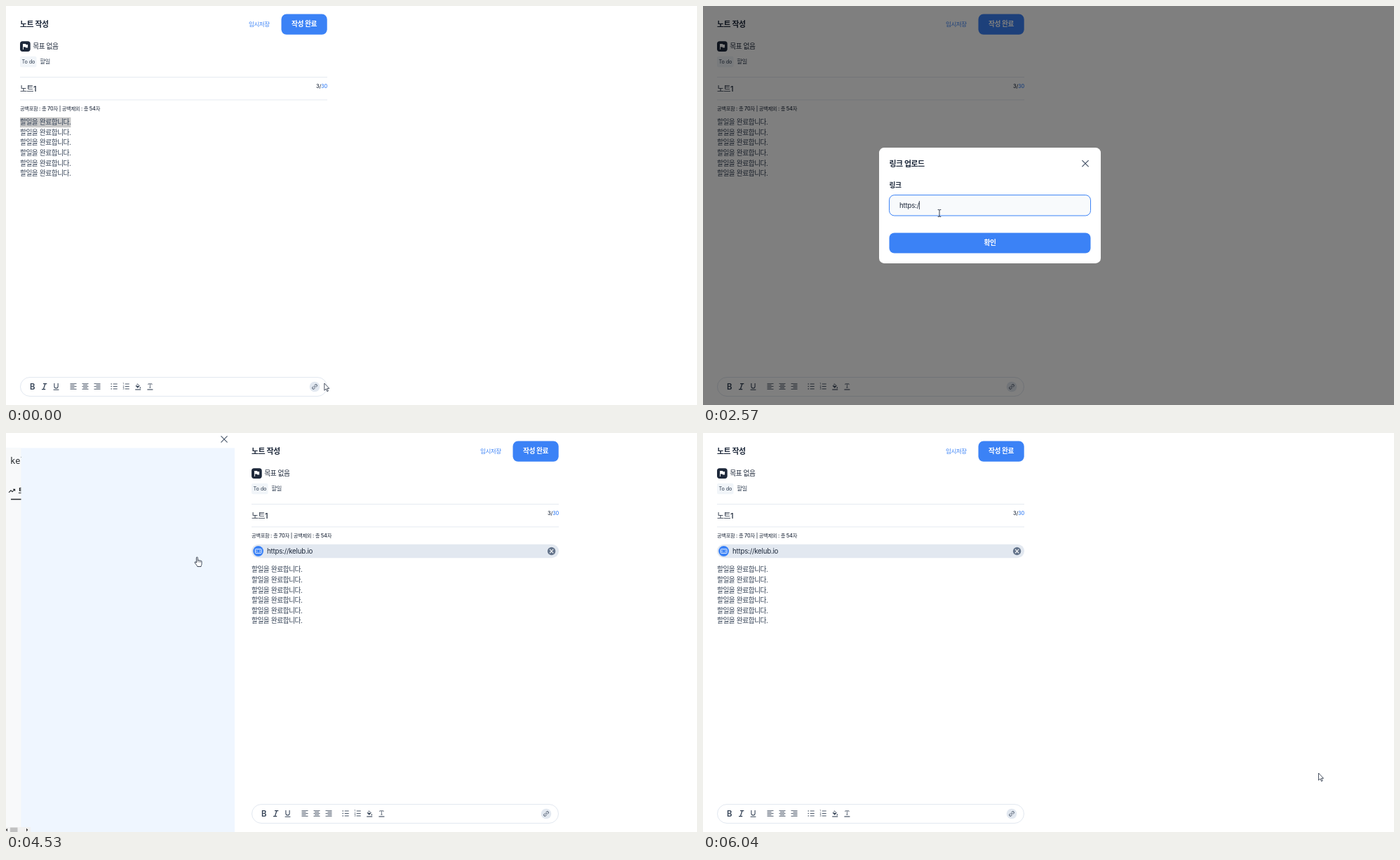
Recreate the animation shown at these times as an HTML page. Size 985 by 569 pixels, loop 6120 ms.

```html
<!DOCTYPE html>
<html lang="ko">
<head>
<meta charset="utf-8">
<title>노트 작성</title>
<style>
html, body { margin: 0; width: 100%; height: 100%; overflow: hidden; background: #fff; }
svg { display: block; width: 100%; height: 100%; }
text { font-family: Inter, 'Noto Sans CJK KR', 'Noto Sans CJK', sans-serif; white-space: pre; }
.ko { letter-spacing: -.052em; }
.en { letter-spacing: -.023em; }
.logo { font-family: 'DejaVu Sans Mono', monospace; }
</style>
</head>
<body>
<svg id="stage" viewBox="0 0 985 569" lang="ko"></svg>
<script>
const LOOP = 6120, URL_TEXT = 'https://kelub.io';
const INK = '#1e293b', SLATE = '#334155', LINE = '#e2e8f0', BLUE = '#3b82f6';

// Markup helpers; Hangul runs are set tighter than Latin ones
const text = (x, y, size, str, fill = INK, weight = 400, extra = '') =>
  `<text class="en" x="${x}" y="${y}" font-size="${size}" fill="${fill}" font-weight="${weight}" ${extra}>${
    String(str).replace(/[가-힣]+/g, '<tspan class="ko">$&</tspan>')}</text>`;
const rect = (x, y, w, h, rx, fill, extra = '') =>
  `<rect x="${x}" y="${y}" width="${w}" height="${h}" rx="${rx}" fill="${fill}" ${extra}/>`;
const circle = (x, y, r, fill, extra = '') => `<circle cx="${x}" cy="${y}" r="${r}" fill="${fill}" ${extra}/>`;
const path = (d, stroke, width = 1, extra = '') =>
  `<path d="${d}" fill="none" stroke="${stroke}" stroke-width="${width}" ${extra}/>`;
const cross = (x, y, r, stroke, width) =>
  path(`M${x - r} ${y - r}l${2 * r} ${2 * r}m0 ${-2 * r}l${-2 * r} ${2 * r}`, stroke, width, 'stroke-linecap="round"');
const group = (id, body, extra = '') => `<g id="${id}" ${extra}>${body}</g>`;
const middle = 'text-anchor="middle"';

function lines(y) {
  let out = '';
  for (let i = 0; i < 6; i++) out += text(20, y + i * 14.6, 9.73, '할일을 완료합니다.', SLATE);
  return out;
}

function alignIcon(x, shift) {
  const rows = [9, 6, 9, 6, 9];
  return path(rows.map((w, i) => `M${x - 4.5 + (9 - w) * shift} ${538.6 + i * 1.95}h${w}`).join(''), SLATE, .8);
}

function listIcon(x, numbered) {
  let out = '';
  for (let i = 0; i < 3; i++) {
    const y = 539 + i * 3.5;
    out += path(`M${x - 1.5} ${y}h6`, SLATE, .9);
    out += numbered ? text(x - 4.8, y + 1.2, 3.2, i + 1, SLATE, 500) : circle(x - 4, y, .75, SLATE);
  }
  return out;
}

function toolbar() {
  return rect(20.5, 529.5, 437, 27, 13.5, '#fff', `stroke="${LINE}"`) +
    text(37.6, 546.5, 11.3, 'B', SLATE, 600, middle) +
    path('M53 538.7h5.3M51 546.6h5.2M55.9 538.7l-2.6 7.9', SLATE, 1.3) +
    path('M68.9 538v4.4a2.6 2.6 0 0 0 5.2 0V538M67.6 547.3h7.8', SLATE, 1.05) +
    alignIcon(96, 0) + alignIcon(113, .5) + alignIcon(130, 1) +
    listIcon(154.2, false) + listIcon(171.2, true) +
    path('M187 538.4l3.4 3.4-2.6 2.6-2.8-2.6 2.6-2.6', SLATE, .8) +
    `<path d="M185 541.8h5.4l-2.6 2.6zM191.3 543c1.4 2 .5 2.4 0 2.4s-1.4-.4 0-2.4z" fill="${SLATE}"/>` +
    path('M184.2 547h8', SLATE, 1.1) +
    path('M202.8 540.2v-1.4h5.2v1.4M205.4 538.8v5.4M204.2 544.2h2.4', SLATE, .7) + path('M201.4 547h8', SLATE, 1.1) +
    circle(440, 543, 7.3, LINE) +
    `<g transform="rotate(-45 440 543)">${path('M439.2 541.4h-1.7a1.6 1.6 0 0 0 0 3.2h1.7M440.8 541.4h1.7a1.6 1.6 0 0 1 0 3.2h-1.7M438.5 543h3', SLATE, .9)}</g>`;
}

function linkBar() {
  return rect(20, 158.7, 438, 19.5, 9.75, LINE) + circle(29.6, 168.5, 7.4, BLUE) +
    rect(25.4, 165.6, 8.6, 5.8, .8, 'none', 'stroke="#fff" stroke-width=".9"') +
    path('M28.3 167.2l-1.3 1.3 1.3 1.3M31.2 167.2l1.3 1.3-1.3 1.3', '#fff', .8) +
    text(42, 171.8, 9.73, URL_TEXT) +
    circle(447.6, 168.5, 5.7, '#64748b') + cross(447.6, 168.5, 2.3, '#fff', 1.1);
}

function page() {
  return text(20, 30, 10.95, '노트 작성', INK, 600) +
    text(346, 29.4, 8.51, '임시저장', BLUE, 500) +
    rect(392.5, 11.6, 65.2, 29.2, 7.3, BLUE) + text(425, 29.4, 9.73, '작성 완료', '#fff', 600, middle) +
    rect(20, 50.3, 14.7, 14.7, 3.7, INK) +
    '<path d="M24 54h4l.5 1h2.6v4.6h-3l-.5-1h-2.7V62H24z" fill="#fff"/>' +
    text(38.3, 61, 9.73, '목표 없음', INK, 500) +
    rect(20, 71.8, 23.5, 15.4, 2.5, '#f1f5f9') + text(22.6, 82.2, 7.3, 'To do', SLATE) +
    text(48.2, 81.7, 8.51, '할일', SLATE) +
    path('M20 101.5H458M20 133.9H458', LINE, .9) +
    text(20, 121.6, 10.95, '노트1', INK, 500) +
    text(458, 116.9, 7.3, `3/<tspan fill="${BLUE}">30</tspan>`, INK, 500, 'text-anchor="end"') +
    text(20, 149, 7.3, '공백포함 : 총 70자 | 공백제외 : 총 54자', INK, 500) +
    group('plain', rect(20, 158.8, 72.4, 14.4, 0, '#c8c8c8', 'id="mark"') + lines(169.2)) +
    text(20, 169.2, 9.73, '할일을 완료합니다.', '#fff', 400, 'id="marked"') +
    group('linked', linkBar() + lines(198.4)) + toolbar();
}

function modal() {
  return rect(0, 0, 985, 569, 0, '#000', 'opacity=".5"') +
    rect(251, 202, 316, 165, 7.3, '#fff') +
    text(265.6, 228.7, 10.95, '링크 업로드', INK, 700) + cross(545, 224.6, 4.3, '#475569', 1.2) +
    text(265.6, 258.5, 9.73, '링크', INK, 600) +
    rect(265.5, 269.6, 287, 29.4, 7.3, '#f8fafc', 'id="field"') +
    text(280, 287.7, 9.73, '영상이나 글, 파일의 링크를 넣어주세요', '#94a3b8', 400, 'id="hint"') +
    text(280, 287.7, 9.73, '', INK, 400, 'id="typed"') +
    rect(0, 278, .8, 12, 0, INK, 'id="caret"') +
    rect(265.5, 323.4, 287, 29.2, 7.3, BLUE) + text(409, 341.3, 9.73, '확인', '#fff', 600, middle);
}

function card(y, title) {
  const bone = (x, dy, w, h = 8) => rect(x, y + dy, w, h, 1, '#e9ecef');
  return rect(16, y, 294, 284, 3, '#fff') +
    `<g class="bones">${bone(16, 0, 294, 150) + bone(26, 165, 170) + bone(26, 186, 260, 6) + bone(26, 198, 220, 6) + bone(26, 228, 70, 6)}</g>` +
    `<g class="loaded">${rect(16, y, 294, 150, 3, 'url(#thumb)') +
      text(26, y + 174, 9.73, title, '#212529', 700) +
      text(26, y + 192, 8.5, '배운 내용을 짧게 적고 다시 읽어 봅니다.', '#495057') +
      text(26, y + 230, 7.3, '3일 전 · 2개의 댓글', '#868e96') +
      path(`M16 ${y + 248}H310`, '#f1f3f5') +
      circle(33, y + 265, 7, '#ced4da') + text(270, y + 268, 7.3, '♥ 24', '#212529')}</g>`;
}

function panel() {
  const site = rect(0, 21, 326, 548, 0, '#f8f9fa') +
    `<text class="logo" x="6" y="44.4" font-size="11.9" font-weight="500" fill="#212529">kelub</text>` +
    circle(250, 40, 3.2, 'none', 'stroke="#212529"') + path('M252.4 42.4l2.5 2.5', '#212529') +
    rect(270, 31, 42, 18, 9, '#212529') + text(291, 43.2, 8.5, '로그인', '#fff', 700, middle) +
    path('M4 84.8l3-3 2 2 3.4-3.4M10 80.2h2.6v2.6', '#212529', 1.1) +
    text(17.5, 86, 9.73, '트렌딩', '#212529', 700) + text(62, 86, 9.73, '최신', '#868e96') +
    rect(7, 93.8, 45, 1.5, 0, '#212529') +
    group('cards', card(121, '매일 쓰는 개발 노트') + card(425, '작은 습관 만들기'));
  return rect(0, 0, 326, 21.4, 0, '#fff') + rect(0, 21.4, 326, 548, 0, '#eff6ff') +
    `<g clip-path="url(#frame)">${site}</g>` +
    group('scroll', rect(0, 562, 35, 7, 0, '#f1f1f1') + rect(6, 562.6, 10.5, 6.4, 0, '#c1c1c1') +
      '<path d="M2 563.8v4.4l-2.2-2.2zM29 563.8v4.4l2.4-2.2z" fill="#333"/>') +
    cross(311, 8.9, 4.2, '#475569', 1.1);
}

const cursors =
  group('arrow', `<path d="M0 0V10.2L2.4 8 4 11.7 5.6 11 4 7.4H7z" fill="#fff" stroke="${INK}" stroke-width=".8" stroke-linejoin="round"/>`) +
  group('beam', path('M-2.3 -5h1.4l.9.7.9-.7h1.4M-2.3 5h1.4l.9-.7.9.7h1.4M0 -4.3V4.3', INK, .9)) +
  group('hand', `<path d="M-1.2.9c0-1.2 1.9-1.2 1.9 0v4c.3-.9 1.9-.8 2 .2.4-.7 1.9-.6 1.9.4.5-.5 1.8-.4 1.8.7v3.3c0 1.9-.9 2.5-1 4H.2c0-1.4-2.8-3.6-3.6-5.6-.4-1.3.9-1.6 1.5-.7l.7 1z" fill="#fff" stroke="${INK}" stroke-width=".85" stroke-linejoin="round"/>` +
    path('M.7 4.9v2.4M2.7 5.3v2.2M4.6 5.7v2', INK, .6));

const stage = document.getElementById('stage');
stage.innerHTML = `<defs><clipPath id="frame">${rect(0, 21.4, 21.5, 548, 0, '#000', 'id="frameBox"')}</clipPath>
  <linearGradient id="thumb" x2="1" y2="1"><stop stop-color="#dbe4ee"/><stop offset="1" stop-color="#a9b8ca"/></linearGradient></defs>` +
  rect(0, 0, 985, 569, 0, '#fff') + group('page', page()) + group('panel', panel()) +
  group('modal', modal()) + group('cursor', cursors);

const el = {};
stage.querySelectorAll('[id]').forEach(n => el[n.id] = n);
const set = (n, attrs) => { for (const k in attrs) n.setAttribute(k, attrs[k]); };
const show = (n, on) => n.style.display = on ? '' : 'none';
const showAll = (cls, on) => stage.querySelectorAll(cls).forEach(n => show(n, on));

// Pointer moves: start, end, steps, target x, target y
const START = [453.8, 538];
const moves = [
  [80, 420, 5, 439.7, 542.3],
  [580, 1070, 7, 337, 295.5],
  [3730, 4290, 8, 272.6, 177],
  [4640, 4950, 4, 296, 70],
  [5200, 5450, 4, 313, 6.8],
  [5770, 6040, 4, 877.5, 485]
];
// Moments at which the typed text reaches a length
const keys = [[1150, 0], [1730, 1], [1810, 2], [2070, 3], [2160, 4], [2240, 5], [2490, 6], [2570, 7], [2740, 8],
  [2830, 9], [2990, 10], [3070, 11], [3240, 12], [3320, 13], [3480, 15], [3560, 16]];

function pointer(t) {
  let [x, y] = START;
  for (const [a, b, n, tx, ty] of moves) {
    if (t < a) break;
    const p = Math.min(1, (Math.floor((t - a) / (b - a) * (n - 1) + 1e-6) + 1) / n);
    const e = p * p * (3 - 2 * p);
    x += (tx - x) * e;
    y += (ty - y) * e;
  }
  return [x, y];
}

function render(t) {
  const modalOn = t >= 250 && t < 3730, linked = t >= 3730;
  const focused = t >= 1150 && modalOn, panelOn = t >= 4380 && t < 5530;
  const shifted = t >= 4380 && t < 5770, marked = t < 1150;

  set(el.page, { transform: `translate(${shifted ? 330 : 0} 0)` });
  show(el.plain, !linked);
  show(el.linked, linked);
  show(el.mark, marked);
  set(el.mark, { fill: modalOn ? '#3474ee' : '#c8c8c8' });
  show(el.marked, marked && modalOn);

  show(el.modal, modalOn);
  set(el.field, { stroke: focused ? BLUE : 'none' });
  const [last, count] = keys.filter(k => k[0] <= t).pop() || [0, 0];
  el.typed.textContent = URL_TEXT.slice(0, count);
  show(el.hint, !count);
  show(el.caret, focused && Math.floor((t - last) / 500) % 2 === 0);
  if (focused) set(el.caret, { x: 280 + (count ? el.typed.getComputedTextLength() : 0) });

  show(el.panel, panelOn);
  const wide = t >= 4640;
  set(el.frameBox, { width: wide ? 326 : 21.5 });
  show(el.scroll, !wide);
  show(el.cards, wide);
  showAll('.bones', t < 5030);
  showAll('.loaded', t >= 5030);

  const [x, y] = pointer(t);
  const inField = modalOn && x > 265 && x < 553 && y > 269 && y < 300;
  const onBar = linked && t < 4640 && y < 178.5;
  const beam = inField || (linked && t < 4380 && !onBar);
  set(el.cursor, { transform: `translate(${x} ${y})`, opacity: t >= 5530 && t < 5770 ? .7 : 1 });
  show(el.beam, beam);
  show(el.hand, onBar);
  show(el.arrow, !beam && !onBar);
}

const t0 = performance.now();
function tick() {
  render((performance.now() - t0) % LOOP);
  requestAnimationFrame(tick);
}
tick();
</script>
</body>
</html>
```
